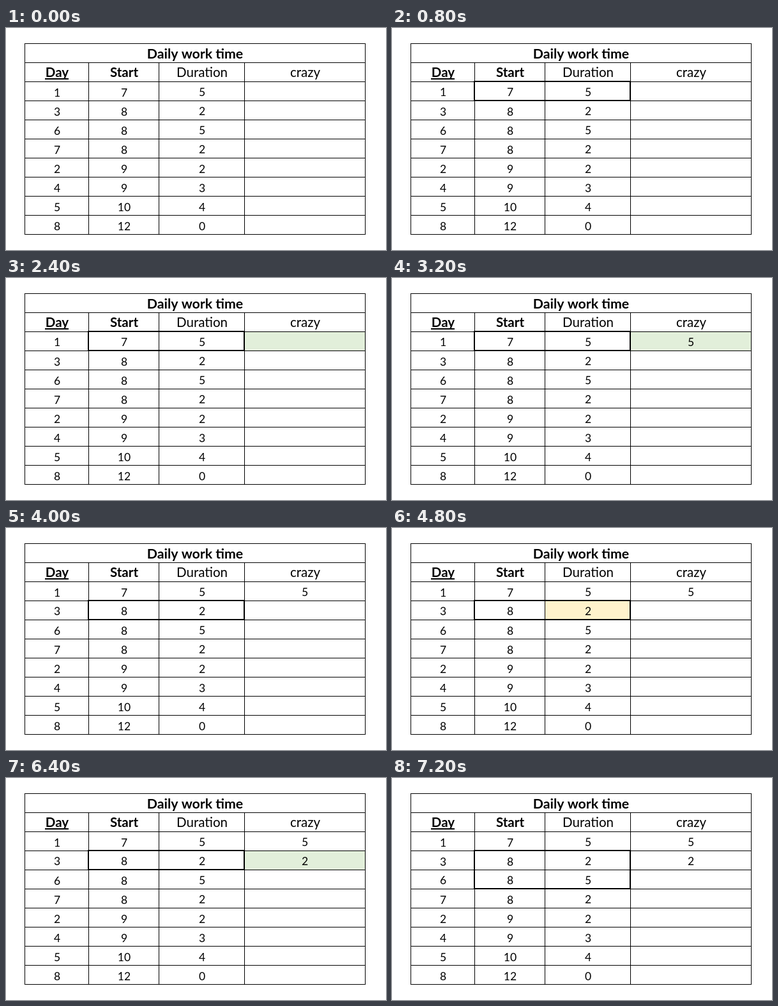
These frames come from a looping animation (595 by 349 pixels, 8000 ms). An HTML page with a canvas:

```html
<!DOCTYPE html>
<html lang="en">
<head>
<meta charset="utf-8">
<title>Daily work time</title>
<style>
  html, body { margin: 0; width: 100%; height: 100%; overflow: hidden; background: #fff; }
  canvas { display: block; }
</style>
</head>
<body>
<canvas id="stage" width="595" height="349"></canvas>
<script>
const ctx = document.getElementById('stage').getContext('2d');

const STEP = 800;
const ROW = 30;
const TOP = 24;
const BODY = 84;
const BOTTOM = 324;
const LINES_X = [29, 129, 239, 373, 562];
const CENTERS = [80, 185, 307, 468];
const YELLOW = '#fff2cc';
const GREEN = '#e2efda';

const rows = [[1, 7, 5], [3, 8, 2], [6, 8, 5], [7, 8, 2], [2, 9, 2], [4, 9, 3], [5, 10, 4], [8, 12, 0]];

// box: first and last outlined row; fill: [row, column, colour]; results: filled rows of the last column
const steps = [
  { results: 0 },
  { box: [0, 0], results: 0 },
  { box: [0, 0], fill: [0, 2, YELLOW], results: 0 },
  { box: [0, 0], fill: [0, 3, GREEN], results: 0 },
  { box: [0, 0], fill: [0, 3, GREEN], results: 1 },
  { box: [1, 1], results: 1 },
  { box: [1, 1], fill: [1, 2, YELLOW], results: 1 },
  { box: [1, 1], fill: [1, 3, GREEN], results: 1 },
  { box: [1, 1], fill: [1, 3, GREEN], results: 2 },
  { box: [1, 2], results: 2 }
];

function rect(x, y, w, h, color = '#000') {
  ctx.fillStyle = color;
  ctx.fillRect(x, y, w, h);
}

function text(str, x, y, size, weight = 400) {
  ctx.font = `${weight} ${size}px Lato, sans-serif`;
  ctx.textAlign = 'center';
  ctx.fillStyle = '#000';
  ctx.fillText(str, x, y);
}

function drawGrid() {
  const [left, right] = [LINES_X[0], LINES_X[4]];
  for (let y = TOP; y <= BOTTOM; y += ROW) rect(left, y, right - left + 1, 1);
  LINES_X.forEach((x, i) => {
    const y = i % 4 ? TOP + ROW : TOP;
    rect(x, y, 1, BOTTOM - y + 1);
  });
}

function drawBox([first, last]) {
  const x = LINES_X[1] - 1, right = LINES_X[3] + 1;
  const y = BODY + first * ROW - 1, bottom = BODY + (last + 1) * ROW + 1;
  rect(x, y, right - x, 2);
  rect(x, bottom - 2, right - x, 2);
  rect(x, y, 2, bottom - y);
  rect(right - 2, y, 2, bottom - y);
}

function drawHeadings() {
  text('Daily work time', 296, 48, 21.3, 700);
  text('Day', CENTERS[0], 77, 20.5, 700);
  rect(61, 79, 37, 2);
  text('Start', CENTERS[1], 77, 20.5, 700);
  text('Duration', CENTERS[2], 77, 20.5);
  text('crazy', CENTERS[3] + 0.5, 77, 20.5);
}

function drawNumbers({ box, results }) {
  rows.forEach((row, r) => {
    const base = BODY + r * ROW + 24;
    // a thick lower border lifts the text by a pixel
    const lift = box && box[1] === r ? 1 : 0;
    text(row[0], CENTERS[0], base - lift, 17.5);
    text(row[1], CENTERS[1], base - lift, 17.5);
    text(row[2], CENTERS[2], base - (r < 4 ? 1 : 0), 17.5);
    if (r < results) text(row[2], CENTERS[3], base - 1, 17.5);
  });
}

function draw(now) {
  const step = steps[Math.floor(now / STEP) % steps.length];
  rect(0, 0, 595, 349, '#fff');
  if (step.fill) {
    const [r, c, color] = step.fill;
    rect(LINES_X[c], BODY + r * ROW, LINES_X[c + 1] - LINES_X[c], ROW, color);
  }
  drawGrid();
  if (step.box) drawBox(step.box);
  drawHeadings();
  drawNumbers(step);
}

const start = performance.now();
function tick() {
  draw(performance.now() - start);
  requestAnimationFrame(tick);
}
tick();
</script>
</body>
</html>
```
